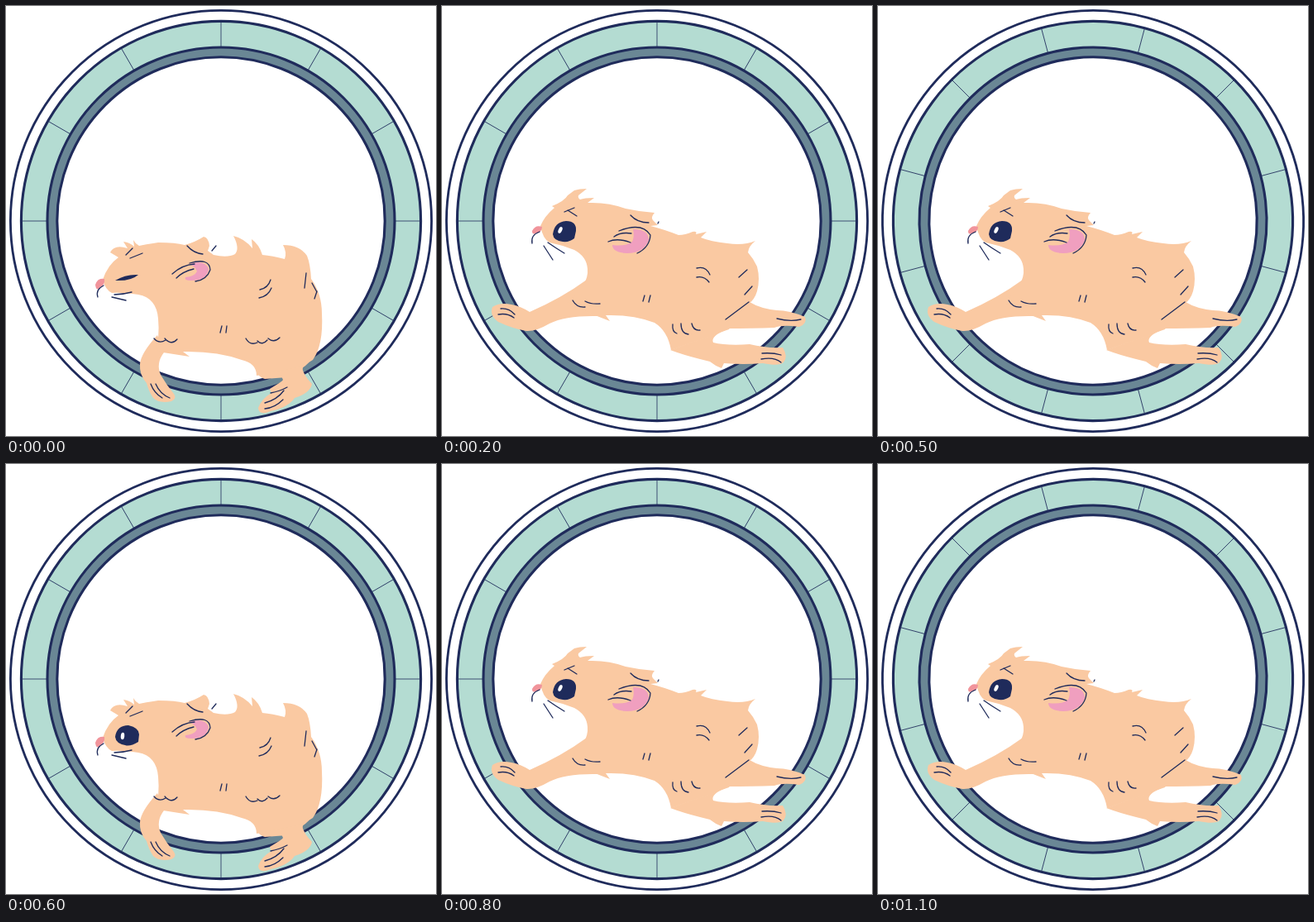
An HTML page with a canvas that plays this animation: 520x520 px, repeating every 1.2 s.

```html
<!DOCTYPE html>
<html lang="en">
<head>
<meta charset="utf-8">
<title>Hamster wheel</title>
<style>
html, body { margin: 0; width: 100%; height: 100%; overflow: hidden; background: #fff; }
canvas { display: block; }
</style>
</head>
<body>
<canvas width="520" height="520"></canvas>
<script>
const ctx = document.querySelector('canvas').getContext('2d');
const NAVY = '#1f2b5b', MINT = '#b4dcd2', SLATE = '#6a8795', PEACH = '#fac9a2';

// Each part holds two paths with the same commands: crouched, then stretched.
const torso = [
  `M117 331 Q123 313 136 304 L126 298 Q131 288 147 293 L142 285 Q150 286 155 291
   L154 283 Q156 287 161 290 Q170 288 178 287 L184 286 Q205 286 216 289
   Q228 286 239 279 Q245 280 246 290 L244 296 L251 301 Q268 305 277 300
   Q283 293 275 278 Q288 281 298 293 L297 282 Q306 288 310 301 Q322 302 337 306
   Q340 298 335 289 Q355 289 364 302 Q368 312 369 330 Q382 348 382 372
   Q384 410 371 428 L358 436 L303 447 Q303 432 285 428 Q255 417 214 418
   L222 424 L190 419 L181 416 Q186 400 184 378 Q182 353 160 349
   Q140 346 128 347 Q120 343 117 331Z`,
  `M119 266 Q124 254 136 244 L133 242 Q148 236 152 229 L160 223 Q166 221 175 221
   L165 229 Q164 232 167 234 Q172 232 184 232 L176 238 Q201 237 222 245
   Q240 249 257 250 Q252 256 255 259 L261 265 L252 266 Q268 270 286 277
   Q294 277 303 273 Q309 272 307 276 L320 273 Q316 277 313 280 Q325 285 345 287
   Q365 290 379 284 Q371 290 370 298 Q377 306 381 315 Q385 330 381 345
   Q378 355 371 360 L347 391 L277 416 Q273 393 257 383 Q232 373 198 374
   L203 381 L185 374 L150 358 Q178 338 176 318 Q175 303 160 295
   Q145 289 130 286 Q122 282 119 266Z`
];

const foreleg = [
  `M183 398 Q163 420 162 433 Q161 446 170 456 Q173 467 178 474 Q185 481 200 478
   Q207 475 203 469 Q194 458 187 446 Q181 432 191 419Z`,
  `M175 331 Q145 353 106 370 Q95 363 84 361 Q70 358 61 364 Q57 374 68 382
   Q85 390 102 393 Q113 394 130 384 Q150 374 189 375Z`
];

const nearLeg = [
  `M303 436 Q301 447 313 451 L340 449 Q331 456 319 463 L321 468 Q309 475 305 486
   Q306 496 320 490 Q342 485 349 474 Q368 468 370 457 Q361 448 358 438
   Q374 428 376 405Z`,
  `M276 416 Q292 422 312 427 L324 430 Q330 435 338 438 L341 432 Q365 434 388 432
   Q408 436 413 431 Q419 424 412 413 Q392 414 372 409 Q345 411 328 407
   Q324 399 347 390Z`
];

const farLeg = [
  `M330 420 Q328 440 335 452 Q330 460 326 470 Q335 478 345 472 Q358 468 360 460
   Q354 440 366 420Z`,
  `M344 390 Q375 390 402 389 Q412 385 432 388 Q442 384 439 376 Q420 368 405 368
   Q385 366 372 358Z`
];

const nose = [
  'M108 337 Q111 328 119 330 Q120 337 114 340 Q109 346 108 337Z',
  'M109 272 Q113 264 121 267 Q121 274 113 275 Q109 277 109 272Z'
];

const ear = [
  'M222 312 Q240 306 245 318 Q243 332 224 332 Q215 332 217 328 Q228 327 231 321 Q229 315 222 312Z',
  'M231 270 Q250 270 250 283 Q244 299 224 299 Q206 298 206 289 Q222 291 230 285 Q233 279 231 270Z'
];

const eye = [
  'M132 330 Q134 316 148 316 Q161 319 161 327 L160 336 Q150 342 144 340 Q133 338 132 330Z',
  'M134 276 Q136 261 150 260 Q163 260 162 272 L160 281 Q154 286 146 285 Q135 284 134 276Z'
];
const closedEye = 'M132 332 Q145 324 160 325 Q151 333 132 332Z';

// Mouth, whiskers, brows, ear and nape
const faceLines = [
  `M118 338 Q108 343 111 352 M131 349 Q141 349 152 346 M128 352 L145 356
   M145 301 L153 293 M150 305 L165 299 M222 311 Q246 304 247 319
   M247 319 Q243 331 229 333 M201 324 Q213 313 228 312 M206 329 Q214 321 227 318
   M219 290 Q227 299 238 300 M249 296 L254 290`,
  `M118 273 Q107 277 109 287 M128 286 Q138 293 148 299 M123 290 L134 307
   M148 249 L160 244 M152 247 L163 254 M214 272 Q242 261 252 277
   M252 277 Q251 292 236 299 M201 285 Q212 280 228 286 M208 279 Q216 273 229 275
   M228 253 Q236 262 250 262 M261 263 L262 261`
];

// Fur ticks and toes
const furLines = [
  `M320 331 Q317 341 307 343 M321 341 Q317 351 306 353 M363 323 L361 341
   M370 335 L376 346 M376 345 L373 354 M259 395 L261 387 M266 395 L267 387
   M179 402 Q185 409 193 404 M192 402 Q200 411 207 403 M290 402 Q295 411 304 407
   M304 405 Q310 411 316 404 M317 402 Q324 408 331 401
   M175 457 Q179 468 189 474 M181 457 Q186 469 198 474 M313 480 Q328 476 336 465
   M313 487 Q325 486 335 476 M320 468 Q331 466 340 461`,
  `M308 317 Q319 314 324 325 M308 328 Q317 326 323 334 M369 319 L359 328
   M375 339 L366 349 M371 358 L343 379 M243 357 L245 350 M250 358 L252 350
   M158 356 Q163 365 173 364 M173 357 Q180 361 191 360 M279 385 Q278 394 284 396
   M289 384 Q289 396 298 397 M302 384 Q304 393 312 392
   M68 373 Q79 371 87 377 M71 366 Q81 365 88 373 M387 420 Q400 419 410 422
   M386 427 Q402 424 410 431 M405 378 Q421 382 434 379`
];

function morph([from, to], t) {
  const ends = to.match(/\d+/g);
  let i = 0;
  return new Path2D(from.replace(/\d+/g, n => +n + (ends[i++] - n) * t));
}

function ring(radius, width, color) {
  ctx.beginPath();
  ctx.arc(0, 0, radius, 0, 2 * Math.PI);
  ctx.lineWidth = width;
  ctx.strokeStyle = color;
  ctx.stroke();
}

function drawWheel(angle) {
  ctx.save();
  ctx.translate(260, 260);
  ctx.rotate(angle);
  ring(254.6, 2.8, NAVY);
  ring(225.8, 31.5, MINT);
  ring(204, 12, SLATE);
  ctx.lineWidth = 0.8;
  ctx.strokeStyle = NAVY;
  for (let k = 0; k < 12; k++) {
    ctx.beginPath();
    ctx.moveTo(211, 0);
    ctx.lineTo(240, 0);
    ctx.stroke();
    ctx.rotate(Math.PI / 6);
  }
  for (const r of [241.6, 210, 198.2]) ring(r, 3.1, NAVY);
  ctx.restore();
}

function drawHamster(stretch, blink) {
  const fill = (part, color) => {
    ctx.fillStyle = color;
    ctx.fill(morph(part, stretch));
  };
  for (const part of [farLeg, nearLeg, foreleg, torso]) fill(part, PEACH);
  fill(nose, '#f1949b');
  fill(ear, '#f09fbf');
  ctx.lineWidth = 1.3;
  ctx.lineCap = 'round';
  ctx.strokeStyle = NAVY;
  for (const lines of [faceLines, furLines]) ctx.stroke(morph(lines, stretch));
  if (blink) {
    ctx.fillStyle = NAVY;
    ctx.fill(new Path2D(closedEye));
    return;
  }
  fill(eye, NAVY);
  ctx.fillStyle = '#fff';
  ctx.beginPath();
  ctx.ellipse(141 + 2 * stretch, 329 - 58 * stretch, 2.2, 4.2, 0.1 + 0.3 * stretch, 0, 2 * Math.PI);
  ctx.fill();
}

function draw() {
  const step = Math.floor(performance.now() / 100) % 12;
  ctx.fillStyle = '#fff';
  ctx.fillRect(0, 0, 520, 520);
  drawWheel(step % 2 * Math.PI / 12);
  drawHamster(step % 3 / 2, step === 0);
  requestAnimationFrame(draw);
}
draw();
</script>
</body>
</html>
```
